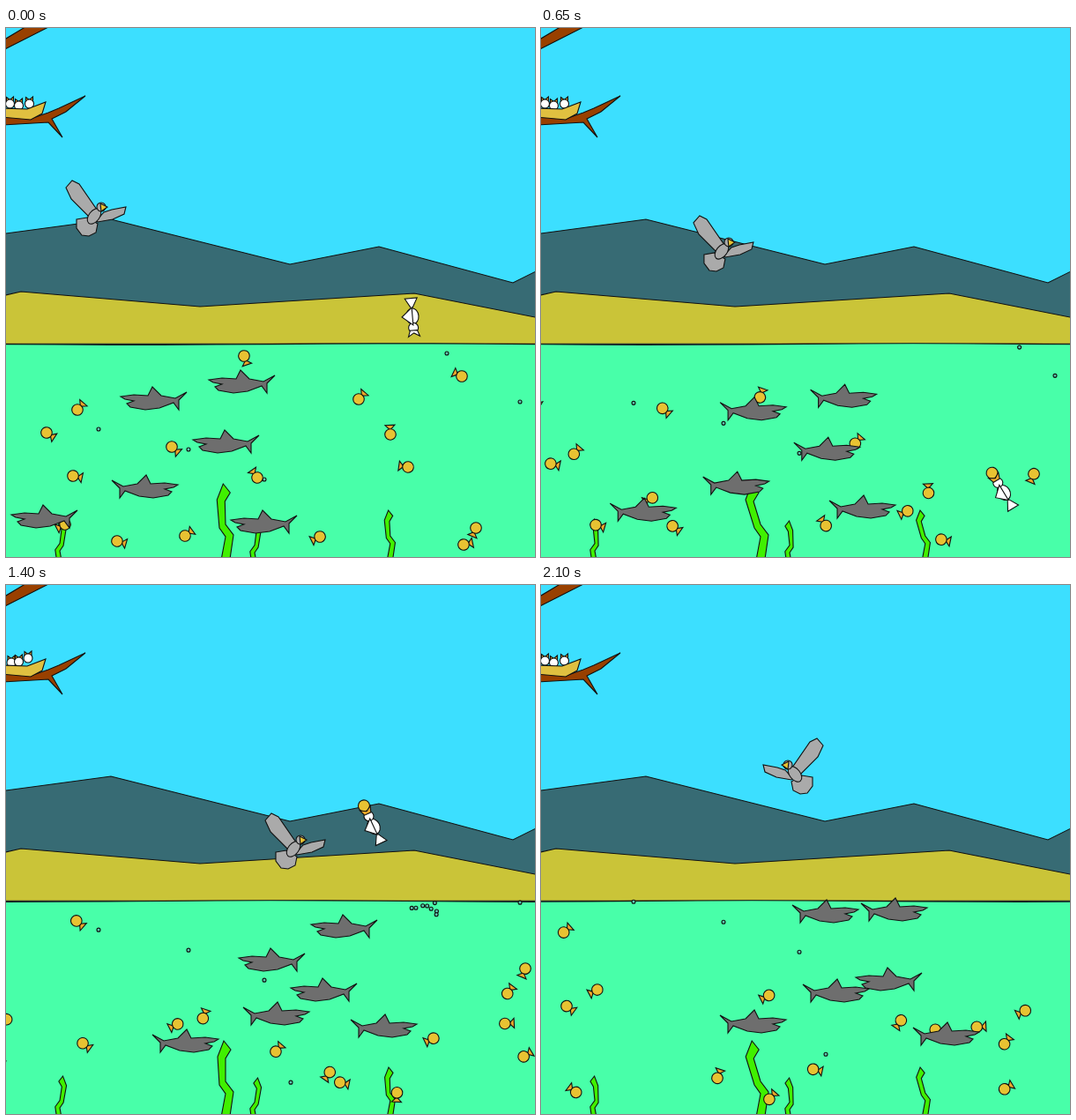
Write an HTML page with a canvas that moves like this. It is 600 px wide and 600 px high and loops after 2.15 s.

```html
<!DOCTYPE html>
<html lang="en">
<head>
<meta charset="utf-8">
<title>Shore life</title>
<style>
html, body { margin: 0; width: 100%; height: 100%; overflow: hidden; background: #3cdfff; }
canvas { display: block; }
</style>
</head>
<body>
<canvas id="stage" width="600" height="600"></canvas>
<script>
const ctx = document.getElementById('stage').getContext('2d');
const STEP = 50, LOOP = 2150, START = performance.now();
const SURFACE = 359, TOP = 364, FLOOR = 590;  // fish bounce between TOP and FLOOR
const SWIM = 5.12, RISE = 2.28, FLY = 25;     // pixels per tick
const CATCH = 3;                              // tick at which the tern has its fish
const INK = '#101010', GOLD = '#e8c232', ORANGE = '#eaa92c', GREY = '#6e6e6e', PALE = '#aaaaaa', BROWN = '#994000';

// x, y, heading in degrees, and the tick it is eaten, if any
const FISH = [
  [270, 372, 251], [81, 433, 131], [46, 459, 213], [188, 475, 221], [76, 508, 192],
  [285, 510, 55], [126, 582, 196], [203, 576, 144], [356, 577, 334], [533, 567, 293],
  [519, 586, 168], [456, 498, 8, 13], [436, 461, 87], [400, 421, 131], [517, 395, 25, CATCH],
  [67, 563, 333], [655, 379, 233], [709, 490, 177], [710, 461, 149], [-126, 560, 332], [-132, 446, 37],
];

// evenly timed path points, and the ticks at which a shark that starts leftward turns round
const SHARKS = [
  { path: [[158, 521], [227, 516], [307, 487], [335, 461]], turns: [0] },
  { path: [[267, 402], [348, 418], [383, 388], [401, 369]], turns: [1, 25, 34] },
  { path: [[167, 421], [246, 433], [301, 426], [323, 371]], turns: [1, 26, 29] },
  { path: [[249, 470], [329, 478], [360, 460], [394, 448]], turns: [1, 24, 29, 38] },
  { path: [[43, 555], [122, 546], [204, 518], [241, 496]], turns: [1] },
  { path: [[292, 561], [370, 542], [429, 501], [460, 510]], turns: [1] },
];

// tick, x, y, heading in degrees
const TERN = [[0, 461, 327, 85], [6, 566, 477, 107], [13, 525, 527, 239], [19, 453.5, 451.5, 288],
  [28, 417, 274, 245], [33, 300, 145, 180], [42, -30, -30, 225]];

// tick, x, y
const HAWK = [[0, 108, 203], [28, 334, 289], [33, 352.5, 253], [42, 280, 204]];

const BUBBLES = [[105, 455], [207, 478], [293, 512], [583, 424], [500, 369]];

let tick = 0;

const rad = deg => deg * Math.PI / 180;
const mix = (a, b, f) => a + (b - a) * f;
const random = n => { const v = Math.sin(n * 127.1) * 43758.5453; return v - Math.floor(v); };

// Value and slope of a cubic from a to b with end slopes u and v.
function cubic(a, u, b, v, f) {
  const c = 3 * (b - a) - 2 * u - v, d = 2 * (a - b) + u + v;
  return [a + f * (u + f * (c + f * d)), u + f * (2 * c + 3 * f * d)];
}

// The two timed keys around the current tick and the fraction between them.
function around(keys) {
  let i = 0;
  while (i < keys.length - 2 && tick >= keys[i + 1][0]) i++;
  const a = keys[i], b = keys[i + 1];
  return [a, b, (tick - a[0]) / (b[0] - a[0])];
}

function paint(fill) {
  ctx.fillStyle = fill;
  ctx.fill();
  ctx.stroke();
}

function poly(fill, ...p) {
  ctx.beginPath();
  for (let i = 0; i < p.length; i += 2) ctx.lineTo(p[i], p[i + 1]);
  ctx.closePath();
  paint(fill);
}

function oval(fill, x, y, rx, ry = rx, turn = 0) {
  ctx.beginPath();
  ctx.ellipse(x, y, rx, ry, turn, 0, Math.PI * 2);
  paint(fill);
}

function place(x, y, draw, turn = 0, flip = 1) {
  ctx.save();
  ctx.translate(x, y);
  ctx.rotate(turn);
  ctx.scale(flip, 1);
  draw();
  ctx.restore();
}

function land() {
  poly('#376b74', -5, 233, 0, 233, 119, 217, 322, 268, 423, 248, 575, 289, 605, 274, 605, 350, -5, 350);
  poly('#cac438', -5, 304, 17, 299, 220, 316, 463, 301, 605, 329, 605, 358.3, -5, 358.3);
}

function water() {
  const p = [-5, 605];
  for (let x = -5; x <= 605; x += 61) p.push(x, SURFACE - 0.4 + 0.8 * Math.sin(x / 95 + tick * 0.5));
  poly('#48ffa9', ...p, 605, 605);
}

// The top of a weed sways, its foot stands still.
function weed(x, y, sx, sy, lean) {
  const at = (dx, dy, shift = 0) => [x + shift + dx * sx, y + dy * sy];
  poly('#40f000', ...at(0, 0, lean), ...at(8, 10, lean), ...at(2, 20, lean), ...at(6, 46), ...at(15, 58),
    ...at(10, 92), ...at(0, 92), ...at(6, 60), ...at(-1, 50), ...at(-7, 18, lean));
}

function weeds() {
  const sway = 4 * Math.cos((tick + 3) * Math.PI * 2 / 31);
  weed(64.5, 557, -0.58, 0.6, sway * 0.5 - 2);
  weed(285.5, 559, -0.58, 0.6, sway * 0.5 - 2);
  weed(243, 517, 1, 1, sway);
  weed(432, 547, 0.63, 0.63, sway * 0.5);
}

function fish([x, y, heading, eaten = Infinity]) {
  if (tick >= eaten) return;
  const way = tick * SWIM, dx = Math.cos(rad(heading)), dy = Math.sin(rad(heading));
  const span = FLOOR - TOP;
  const depth = (y + dy * way - TOP + 2 * span) % (2 * span);
  const bounced = depth > span || y + dy * way < TOP;
  const fold = depth > span ? 2 * span - depth : depth;
  place(x + dx * way, TOP + fold, () => {
    poly(ORANGE, -5, 0, -10.5, -5.5, -10.5, 5.5);
    oval(GOLD, 0, 0, 6.3);
  }, Math.atan2(bounced ? -dy : dy, dx));
}

function shark({ path, turns }) {
  const last = path.length - 1, pos = tick / 42 * last;
  const i = Math.min(Math.floor(pos), last - 1);
  const slope = (k, n) => {
    const a = Math.max(n - 1, 0), b = Math.min(n + 1, last);
    return (path[b][k] - path[a][k]) / (b - a);
  };
  const [x, y] = [0, 1].map(k => cubic(path[i][k], slope(k, i), path[i + 1][k], slope(k, i + 1), pos - i)[0]);
  const left = turns.filter(t => t <= tick).length % 2 === 0;
  place(x, y, () => poly(GREY, -38, -8, -25, -1, -9, -4, 1, -14, 6, -4, 22, -5, 37, -3, 32, 0, 22, 2,
    30, 5, 26, 9, 9, 12, -7, 10, -23, 4, -29, 12, -29, 1), 0, left ? -1 : 1);
}

// y is the height at tick 0
function bubble(x, y, from = 0) {
  const top = y - tick * RISE;
  if (tick >= from && top > SURFACE) oval('#5bc8b0', x, top, 2);
}

// Splash where the tern crosses the surface.
function splash(x, from, count) {
  for (let i = 1; i <= count; i++) {
    const depth = 8 + 20 * random(i + from);
    bubble(x + 36 * (random(i * 3 + from) - 0.5), SURFACE + depth + from * RISE, from);
  }
}

function bubbles() {
  for (const [x, y] of BUBBLES) bubble(x, y);
  bubble(323, 628, 20);
  splash(541, CATCH, 10);
  splash(478, 24, 8);
}

function hawk() {
  const [a, b, f] = around(HAWK);
  place(mix(a[1], b[1], f), mix(a[2], b[2], f), () => {
    poly(PALE, -28, 14, -16, 12, -4, 19, -6, 29, -14, 33, -22, 32, -28, 24);
    poly(PALE, -40, -22, -33, -30, -25, -26, -5, 3, -14, 11, -34, -9);
    poly(PALE, -5, 15, 3, 6, 12, 3, 28, 0, 26, 8, 13, 14, -4, 17);
    oval(PALE, -8, 10.5, 10, 6, -0.9);
    oval(PALE, 0, 0, 5);
    poly(GOLD, -1, -4, 7, 0, 0, 5);
  }, 0, b[1] < a[1] ? -1 : 1);
}

function tern() {
  const [a, b, f] = around(TERN);
  const reach = FLY * (b[0] - a[0]), from = rad(a[3]), to = rad(b[3]);
  const [x, dx] = cubic(a[1], reach * Math.cos(from), b[1], reach * Math.cos(to), f);
  const [y, dy] = cubic(a[2], reach * Math.sin(from), b[2], reach * Math.sin(to), f);
  const climbing = dy < -0.8 * Math.hypot(dx, dy);
  const diving = y > SURFACE && dy > 0;
  const wing = climbing ? -11 : diving ? 0 : 12;
  const full = tick >= CATCH;
  place(x, y, () => {
    poly('#fff', -8, 0, -20.5, -7, -20.5, 7);
    oval('#fff', 0, 0, 9, 7);
    oval('#fff', 13, 0, 5.5);
    if (full) oval(GOLD, 26, 0, 6.5);
    poly(full ? ORANGE : '#fff', 16, -4, 23, -6.5, 19, 0, 23, 6.5, 16, 4);
    poly('#fff', -10, 0, 0, wing, 10, 0);
  }, Math.atan2(dy, dx));
}

function chick(x, y) {
  place(x, y, () => {
    poly(ORANGE, -4, -2, -4, -7.5, 0, -4.5, 4, -8, 4, -2);
    oval('#fff', 0, 0, 5);
  });
}

function nest() {
  const hop = tick > 17 && tick < 31 ? 1 : 0;
  poly(BROWN, -5, 15, 25, -3, 52, -3, -5, 26);
  poly(BROWN, -5, 100, 28, 103, 48, 96, 60, 91, 90, 77, 68, 95, 52, 103, 56, 110, 64, 124, 48, 107, -5, 110);
  chick(4.5 + hop * 1.5, 86 + hop * 2);
  chick(14.5, 88 - hop);
  chick(26.5 - hop * 1.5, 86 - hop * 3);
  poly('#e0c040', -5, 91, 24, 92, 45, 84, 41, 97, 28, 104, -5, 101);
}

function frame() {
  tick = Math.floor(((performance.now() - START) % LOOP) / STEP);
  ctx.fillStyle = '#3cdfff';
  ctx.fillRect(0, 0, 600, 600);
  ctx.strokeStyle = INK;
  ctx.lineWidth = 1.1;
  ctx.miterLimit = 4;
  land();
  water();
  weeds();
  bubbles();
  FISH.forEach(fish);
  SHARKS.forEach(shark);
  nest();
  tern();
  hawk();
  requestAnimationFrame(frame);
}
frame();
</script>
</body>
</html>
```
